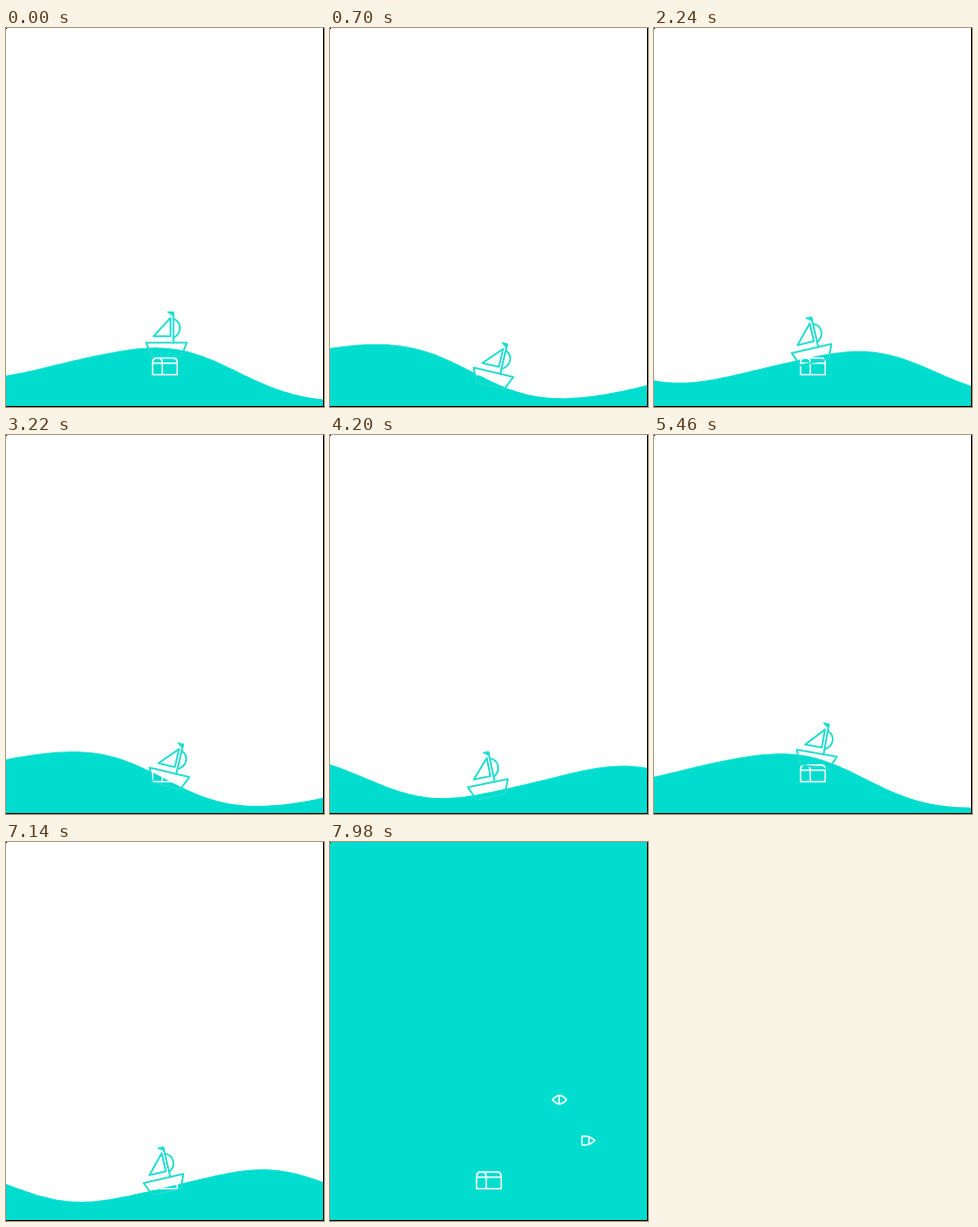
Recreate the animation shown at these times as an HTML page. Size 320 px wide and 381 px high, loop 8000 ms.

```html
<!DOCTYPE html>
<html lang="en">
<head>
<meta charset="utf-8">
<title>Boat on a wave</title>
<style>
  html, body { margin: 0; width: 100%; height: 100%; overflow: hidden; background: #fff; }
  svg { display: block; width: 100%; height: 100%; }
  .line { fill: none; stroke-linejoin: round; stroke-linecap: round; }
</style>
</head>
<body>
<svg viewBox="0 0 320 381" preserveAspectRatio="none">
  <rect width="320" height="381" fill="#fff"/>
  <path id="water" fill="#00ddce"/>
  <g class="line" stroke="#fff" stroke-width="1.5">
    <path d="M147.5 348.5V336.5Q147.5 331.8 152 331.8H168Q172.3 331.8 172.3 336.5V348.5Z"/>
    <path d="M147.5 337H172.3M153 331.8Q157.3 332 157.3 337V348.5"/>
    <path d="M224 259Q231 250.5 238 259Q231 267.5 224 259ZM230.5 255V263"/>
    <path d="M253.5 296Q261 295 266.5 300Q261 305.5 253.5 304.5ZM260.5 296.5V304"/>
  </g>
  <!-- The boat turns around a point at the foot of its hull -->
  <g id="boat" class="line" stroke="#1fdccf" stroke-width="1.8">
    <path d="M-20.5 -13H20.5L14.5 1H-14.5Z"/>
    <path d="M7 -13V-43"/>
    <path d="M1.5 -44H7V-40Z" fill="#1fdccf" stroke-width="1"/>
    <path d="M-13 -19.5L4 -38V-19.5Z"/>
    <path d="M7 -37Q13.5 -34.5 13.5 -28Q13.5 -21.5 7 -18"/>
  </g>
  <path d="M319 0h1v381h-320v-1h319ZM0 0h1v1h-1Z" fill="#000"/>
</svg>
<script>
const LOOP = 8000, STEP = 70, PERIOD = 2650;
const FLOOD_START = 7560, FLOOD_TIME = 420, FLOOD_HEIGHT = 400;
const { sin, cos, tanh, PI } = Math;
const water = document.getElementById('water');
const boat = document.getElementById('boat');

// Leftward wave whose mean level and height vary across the stage
function waterY(x, phase) {
  const angle = phase + (0.932 * x - 135.7) * PI / 180;
  const level = 336 + 0.0575 * x;
  const height = 18.7 + 0.05 * x - 0.000143 * x * x;
  return level - height * cos(angle) - 2.5 * sin(PI * x / 320) * sin(2 * angle);
}

function draw(time) {
  const phase = 2 * PI * time / PERIOD;
  const flood = Math.max(0, (time - FLOOD_START) / FLOOD_TIME);
  const rise = FLOOD_HEIGHT * flood * flood;

  let d = 'M0 381';
  for (let x = 0; x <= 320; x += 4) d += `L${x} ${(waterY(x, phase) - rise).toFixed(2)}`;
  water.setAttribute('d', d + 'V381Z');

  const swing = phase + 0.3;
  const y = 350 - 20.8 * cos(swing) - 1.2 * sin(2 * swing) - rise;
  const tilt = 13.5 * tanh(2.6 * sin(phase));
  boat.setAttribute('transform', `translate(161.5 ${y.toFixed(2)}) rotate(${tilt.toFixed(2)})`);
}

const start = performance.now();
function tick() {
  const time = (performance.now() - start) % LOOP;
  draw(Math.floor(time / STEP) * STEP);
  requestAnimationFrame(tick);
}
tick();
</script>
</body>
</html>
```
